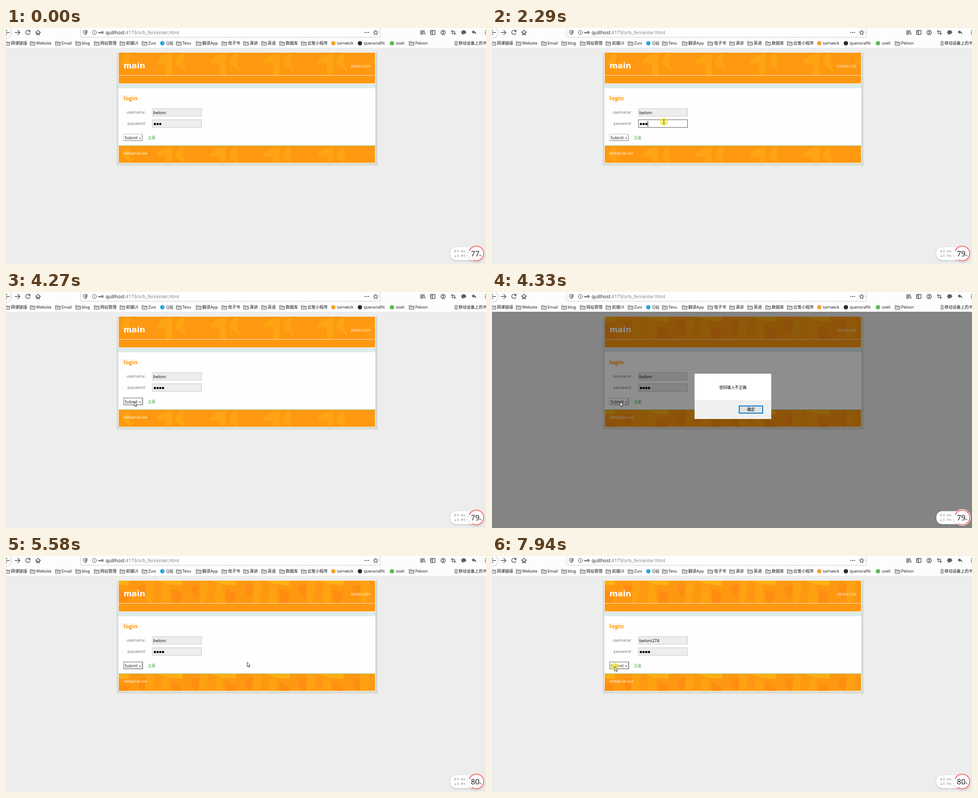
An HTML page for the animation above (8 s loop, 1064x526 px).

```html
<!DOCTYPE html>
<html lang="zh">
<head>
<meta charset="utf-8">
<title>login</title>
<style>
  html, body { margin: 0; width: 100%; height: 100%; overflow: hidden; background: #ededed; }
  svg { display: block; width: 1064px; height: 526px; }
  text { white-space: pre; }
  .ui { font: 9px "Open Sans", "Noto Sans CJK SC", "Noto Sans CJK", sans-serif; }
  .page { font: 8px "DejaVu Sans", "Noto Sans CJK SC", "Noto Sans CJK", sans-serif; }
  .icon { fill: none; stroke: #4a4a4f; stroke-width: 1.4; stroke-linecap: round; stroke-linejoin: round; }
  .solid { fill: #5b5f6b; stroke: none; }
</style>
</head>
<body>
<svg viewBox="0 0 1064 526">
  <defs>
    <pattern id="early" x="80" width="119" height="50" patternUnits="userSpaceOnUse">
      <path fill="#ffa412" d="M2 20L16 7 39 0 38 50H25L24 24 6 24ZM48 14L57 1 65 4 62 20 70 43 55 32 46 26Z"/>
    </pattern>
    <pattern id="late" x="80" width="119" height="50" patternUnits="userSpaceOnUse">
      <path fill="#ffa212" d="M16 10L30 8 36 50H14ZM98 0H119L112 50H100Z"/>
      <path fill="#ffb013" d="M5 0H62L60 11 30 8Z"/>
      <path fill="#ff8d12" d="M38 18L62 30 55 50H38ZM80 12L100 8 95 40 84 32Z"/>
    </pattern>
    <linearGradient id="fade"><stop stop-color="#f0f0ef"/><stop offset="1" stop-color="#c6d0c3"/></linearGradient>
    <linearGradient id="fadeDown" x2="0" y2="1"><stop stop-color="#c3cdc0"/><stop offset="1" stop-color="#f0f0ef"/></linearGradient>
    <filter id="soft" x="-20%" y="-20%" width="140%" height="150%">
      <feDropShadow dx="0" dy="1" stdDeviation="1.5" flood-opacity=".3"/>
    </filter>
    <g id="folder">
      <path d="M.5 9.5V1H4.5L5.5 2.5H11.5V9.5Z" fill="#d9d9d9" stroke="#66666a"/>
      <path d="M.5 4H11.5" stroke="#66666a" stroke-width=".8"/>
    </g>
  </defs>

  <rect width="1064" height="526" fill="#ededed"/>

  <g class="page">
    <rect x="243" y="55" width="7" height="250" fill="url(#fade)"/>
    <rect x="243" y="55" width="7" height="250" fill="url(#fade)" transform="matrix(-1 0 0 1 1069 0)"/>
    <rect x="246" y="301" width="577" height="8" fill="url(#fadeDown)"/>
    <rect x="249" y="55" width="570" height="247" fill="#fefefe"/>
    <rect x="250" y="55" width="568" height="68.5" fill="#ff9811"/>
    <rect x="249" y="124.5" width="570" height="9" fill="#dcebea"/>
    <rect x="249" y="133" width="570" height="1.5" fill="#e9efee"/>
    <rect x="249" y="262" width="570" height="1" fill="#8fb56b"/>
    <rect x="250" y="263" width="568" height="37.5" fill="#ff9811"/>
    <g id="texture">
      <rect width="568" height="50" transform="translate(250 55)"/>
      <rect width="568" height="37.5" transform="translate(250 263)"/>
    </g>
    <rect x="250" y="105" width="568" height="1" fill="#ffe6c4"/>
    <text x="260.5" y="90" fill="#fff" font-size="17.4" font-weight="700">main</text>
    <text x="807.5" y="87.6" fill="#fff" font-size="7.5" text-anchor="end">2009/11/20</text>
    <text class="ui" x="260.5" y="161" fill="#ff9811" style="font-size:12.8px;font-weight:700">login</text>
    <text x="310" y="191" fill="#777" text-anchor="end">username:</text>
    <text x="310" y="216" fill="#777" text-anchor="end">password:</text>
    <rect id="userBox" x="324.5" y="179.5" width="109" height="17"/>
    <rect id="passBox" x="324.5" y="204.5" width="109" height="17"/>
    <text id="user" class="ui" style="font-size:9.5px" x="326.5" y="192"></text>
    <g id="dots"></g>
    <rect id="caret" width="1" height="13" fill="#111"/>
    <rect x="260.5" y="236.5" width="42" height="15" fill="#fff" stroke="#c4c4c4"/>
    <path d="M261 251H302V237" fill="none" stroke="#a4a4a4" stroke-width="1.6"/>
    <rect id="submitFocus" x="260.7" y="236.2" width="42.4" height="15.4" fill="none" stroke="#a2a2a2" stroke-width="1.8"/>
    <text x="263" y="247.5" fill="#222" font-size="8.2">Submit »</text>
    <text x="314" y="247.5" fill="#4cae4f" font-size="8.7">注册</text>
    <text x="260.5" y="281.6" fill="#fff" font-size="7.2">GKN@538.test</text>
  </g>

  <g id="modal">
    <rect y="44" width="1064" height="482" fill="#000" opacity=".443"/>
    <rect x="449" y="182" width="170" height="101" fill="#fff"/>
    <rect x="449" y="243" width="170" height="40" fill="#f0f0f0"/>
    <path d="M449 242.500H619" stroke="#dfdfdf"/>
    <text class="ui" x="534" y="216" text-anchor="middle" style="font-size:8.6px">密码输入不正确</text>
    <rect id="ok" x="548" y="254" width="52" height="16"/>
    <text class="ui" x="574" y="265.2" text-anchor="middle" style="font-size:8.6px">确定</text>
  </g>

  <g class="ui">
    <rect width="1064" height="44" fill="#fdfdfd"/>
    <rect x="165.5" y="-4" width="664" height="24.5" rx="1.5" fill="#fff" stroke="#cbcbcb"/>
    <circle cx="0" cy="10" r="13" fill="#fff" stroke="#bbb"/>
    <g class="icon">
      <path d="M8 10H-3M2 5L-3 10 2 15M20 10H31M26 5L31 10 26 15"/>
      <path d="M52.5 7A4.8 4.8 0 1 0 53 11.5M53.3 4.5V7.8H50"/>
      <path d="M65.5 10L71 5 76.5 10M67.5 9.5V15H69.8V11.5H72.2V15H74.5V9.5"/>
      <path d="M176 5L180 6.2C180 11 178.5 13.5 176 15 173.5 13.5 172 11 172 6.2Z" stroke-width="1.2"/>
      <path d="M176 6.5L178.5 7.3C178.5 10.5 177.5 12 176 13Z" fill="#4a4a4f" stroke="none"/>
      <g stroke-width="1"><circle cx="196" cy="10" r="4.6"/><path d="M196 9.5V12.3M196 7.6V7.7"/></g>
      <circle cx="213.5" cy="10" r="2"/><path d="M211.5 10H205.5V11.5M208 10V11.5"/>
      <path d="M819.5 4.8L821 8.3 824.8 8.6 821.9 11.1 822.8 14.8 819.5 12.8 816.2 14.8 817.1 11.1 814.2 8.6 818 8.3Z" stroke-width="1.1"/>
      <path d="M919.5 5.5V14.5M922 5.5V14.5M924.5 5.5V14.5M926.5 6L929 14.5"/>
      <rect x="941" y="5.5" width="10" height="9" rx="1"/><path d="M945.5 5.5V14.5M943 8H943.6M943 10H943.6"/>
      <circle cx="969" cy="10" r="4.8"/><path d="M1062 6H1068M1062 10H1068M1062 14H1068"/>
      <path d="M989 5V12.5H997M986.5 7.5H994.5V15" stroke="#5b5f6b" stroke-width="1.6"/>
    </g>
    <g class="solid">
      <circle cx="795.5" cy="10" r="1.3"/><circle cx="799.5" cy="10" r="1.3"/><circle cx="803.5" cy="10" r="1.3"/>
      <circle cx="969" cy="8.6" r="1.9"/><path d="M965.8 13Q969 9.5 972.2 13Z"/>
      <path d="M1009 9.5A5.5 4.3 0 1 1 1014 13.7L1011 15.5 1011.5 13.2Q1009 12 1009 9.5Z"/>
      <path d="M1032 9L1037 4.8V7.3Q1042.5 7.5 1042 15 1040.5 11 1037 10.8V13.2Z"/>
    </g>
    <text x="221" y="13.6" style="font-size:10.3px" fill="#111">quillhost<tspan fill="#777">:4173/orb_fen/enter.html</tspan></text>
    <g id="bookmarks"></g>
    <rect x="995" y="29.5" width="5.5" height="9.5" rx="1" fill="#b9c4cf" stroke="#67727e" stroke-width=".8"/>
  </g>

  <g class="ui">
    <rect x="985" y="488.5" width="62" height="29" rx="13" fill="#fff" filter="url(#soft)"/>
    <circle cx="1042.5" cy="502.5" r="18.8" fill="#fff" filter="url(#soft)"/>
    <circle id="ring" cx="1042.5" cy="502.5" r="16.5" fill="none" stroke="#ee3b3b" stroke-width="1.6" pathLength="100" transform="rotate(200 1042.5 502.5)"/>
    <path d="M995.5 500.5V495.5M993.3 497.5L995.5 495.3 997.7 497.5" fill="none" stroke="#43b757"/>
    <path d="M995.5 505.5V510.5M993.3 508.5L995.5 510.7 997.7 508.5" fill="none" stroke="#f08a4b"/>
    <g fill="#666" style="font-size:6.5px">
      <text x="1000" y="500.3">0</text><text x="1008.5" y="500.3">K/s</text>
      <text x="1000" y="510.3">0</text><text x="1008.5" y="510.3">K/s</text>
    </g>
    <text id="load" x="1040" y="508.8" text-anchor="middle" style="font-size:16.6px" fill="#111"></text>
    <text x="1049" y="508.5" style="font-size:6px" fill="#222">%</text>
  </g>

  <g id="pointer">
    <circle id="press" r="9" fill="#f4e626" opacity=".65"/>
    <path id="arrow" d="M0 0V9.5L2.2 7.6 3.9 11 5.4 10.3 3.8 7H6.9Z" fill="#fff" stroke="#222" stroke-width=".9"/>
    <path id="beam" d="M-2 -4.5H2M0 -4.5V4.5M-2 4.5H2" fill="none" stroke="#333" stroke-width=".9"/>
  </g>
</svg>
<script>
const LOOP = 8000;
const $ = id => document.getElementById(id);
const set = (id, attrs) => { for (const k in attrs) $(id).setAttribute(k, attrs[k]); };
const show = (id, on) => set(id, { visibility: on ? 'inherit' : 'hidden' });
const within = (t, ...spans) => spans.some(([a, b]) => t >= a && t < b);
const latest = (rows, t) => rows.filter(r => r[0] <= t).pop()[1];

// text x, label, colour of a plain marker (otherwise a folder)
const bookmarks = [
  [11, '网课链接'], [67, 'Website'], [123, 'Email'], [168, 'blog'], [209, '网站管理'],
  [266, '前端UI'], [315, 'Zuvi'], [355, 'Q站', '#22a7dc'], [391, 'Tevu'], [435, '翻译App'],
  [492, '电子书'], [540, '演讲'], [580, '英语'], [620, '数据库'], [668, '云笺小程序'],
  [734, 'tarnwick', '#f0a52b'], [793, 'quenorafilt', '#24282d'], [864, 'ozeli', '#5cb85c'],
  [907, 'Pelvon'], [1003, '移动设备上的书签', 'none']
];
$('bookmarks').innerHTML = bookmarks.map(([x, label, colour]) =>
  (colour ? `<circle cx="${x - 8.5}" cy="34" r="4.8" fill="${colour}"/>`
          : `<use href="#folder" x="${x - 14}" y="29"/>`) +
  `<text x="${x}" y="37.2" fill="#111">${label}</text>`).join('');
$('dots').innerHTML = [330, 336, 342, 348].map(x => `<circle cx="${x}" cy="214" r="2.5"/>`).join('');
const lastDot = $('dots').lastChild;

// first step, last step, number of steps, x, y
const moves = [
  [70, 280, 4, 496, 319], [1070, 1360, 5, 287.5, 265], [1450, 1520, 2, 256, 250],
  [1590, 1740, 3, 269.5, 246], [1910, 2220, 5, 381, 209], [3570, 3950, 6, 284, 245],
  [4800, 5350, 8, 582, 257.5], [5580, 5580, 1, 534.5, 237], [5660, 5970, 5, 372, 183],
  [7290, 7780, 7, 272, 247]
];
const clicks = [[2290, 2460], [4100, 4250], [6050, 6200], [7860, LOOP]];
const [passClick, sendClick, userClick, resendClick] = clicks.map(c => c[0]);
const modalOpen = 4330, okPress = 5510, modalClose = 5580;

// the load readout refreshes about once a second
const loads = [[0, 77], [820, 78], [1820, 79], [2790, 78], [3800, 79], [4800, 80], [5820, 81], [6830, 79], [7780, 80]];
const names = [[0, 'belom'], [6670, 'belom2'], [6750, 'belom27'], [6830, 'belom274']];

const easeOut = p => Math.sin(p * Math.PI / 2);

function pointerAt(t) {
  let x = 1220, y = 637;
  for (const [start, end, n, toX, toY] of moves) {
    if (t < start) break;
    const step = n > 1 ? Math.floor((t - start) / (end - start) * (n - 1) + 1e-6) + 1 : 1;
    const p = easeOut(Math.min(1, step / n));
    x += (toX - x) * p;
    y += (toY - y) * p;
  }
  return [x, y];
}

function paintField(id, focused) {
  set(id, { fill: focused ? '#fff' : '#ededed', stroke: focused ? '#555' : '#c9c9c9' });
}

function draw(t) {
  const modal = within(t, [modalOpen, modalClose]);
  const userFocus = within(t, [userClick, resendClick]);
  const name = latest(names, t);
  const load = latest(loads, t);
  const [x, y] = pointerAt(t);

  set('texture', { fill: t < modalOpen ? 'url(#early)' : 'url(#late)' });
  paintField('userBox', userFocus);
  paintField('passBox', within(t, [passClick, sendClick]));
  $('user').textContent = name;
  lastDot.setAttribute('visibility', t >= 3090 ? 'inherit' : 'hidden');
  show('caret', within(t, [passClick, 2860], [3090, 3410], [userClick, 6590], [6670, 7140]));
  set('caret', userFocus
    ? { x: 354 + (name.length - 5) * 5.4, y: 182 }
    : { x: t < 3090 ? 345 : 351, y: 207 });
  show('submitFocus', within(t, [sendClick, modalOpen], [modalClose, userClick], [resendClick, LOOP]));

  show('modal', modal);
  const pressed = t >= okPress;
  set('ok', {
    fill: pressed ? '#cce4f7' : t >= 5270 ? '#e5f1fb' : '#e1e1e1',
    stroke: pressed ? '#2b74b4' : '#0078d7',
    'stroke-width': pressed ? 1.2 : 2
  });

  $('load').textContent = load;
  set('ring', { 'stroke-dasharray': `${load} 100` });

  const overField = !modal && x > 324 && x < 434 && (y > 179 && y < 197 || y > 204 && y < 222);
  set('pointer', { transform: `translate(${x} ${y})` });
  show('pointer', t >= 70);
  show('arrow', !overField);
  show('beam', overField);
  show('press', within(t, ...clicks));
}

const began = performance.now();
function tick() {
  draw((performance.now() - began) % LOOP);
  requestAnimationFrame(tick);
}
tick();
</script>
</body>
</html>
```
